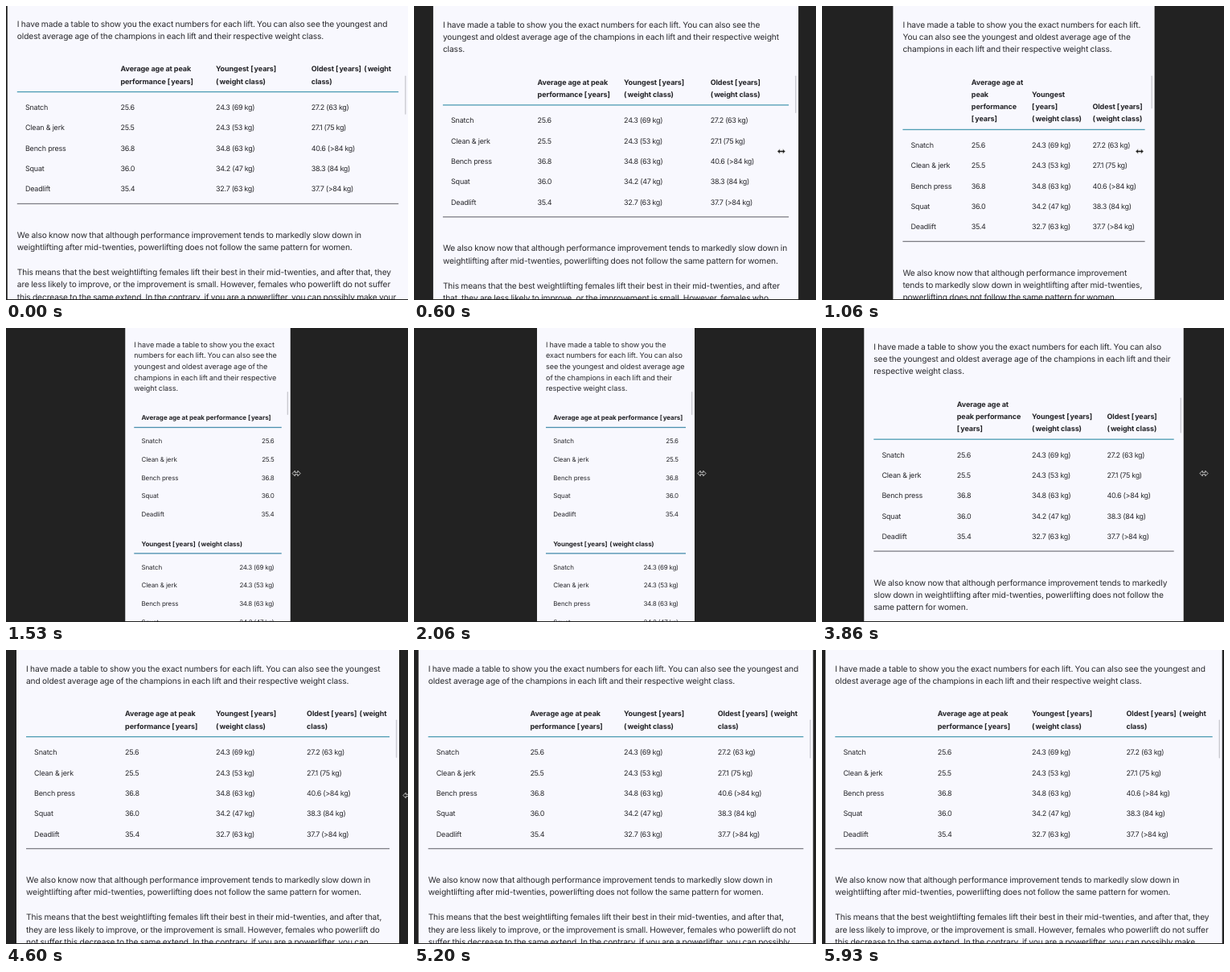
An HTML page that plays this animation: 500 by 365 pixels, repeating every 6000 ms.

```html
<!DOCTYPE html>
<html lang="en">
<head>
<meta charset="utf-8">
<title>Responsive table</title>
<style>
  html, body { margin: 0; width: 100%; height: 100%; overflow: hidden; background: #222; }
  svg { display: block; width: 500px; height: 365px; text-rendering: geometricPrecision; }
  text { font-family: Inter, "Open Sans", sans-serif; fill: #29292d; white-space: pre; }
  .body { font-size: 10.2px; letter-spacing: -.0095em; word-spacing: -.04em; }
  .head { font-size: 9px; font-weight: 700; letter-spacing: -.01em; fill: #222226; }
  .head tspan { letter-spacing: .12em; }
  .label { font-size: 9px; letter-spacing: -.022em; }
  .num { font-size: 9px; letter-spacing: -.035em; }
  .small .body { font-size: 9.07px; letter-spacing: -.005em; }
  .small .head { font-size: 8px; letter-spacing: -.006em; }
  .small .head tspan { letter-spacing: .12em; }
  .small .label { font-size: 8px; letter-spacing: -.013em; }
  .small .num { font-size: 8px; letter-spacing: -.03em; }
</style>
</head>
<body>
<svg viewBox="0 0 500 365">
  <rect id="page" height="364" fill="#f8f8fe"/>
  <g id="content"></g>
  <rect id="bar" width="1.4" rx=".7" fill="#cbcbd2"/>
  <rect y="364" width="500" height="1" fill="#222"/>
  <path id="cursor" d="M-5 0L-1.8 -3.3V-1.2H1.8V-3.3L5 0L1.8 3.3V1.2H-1.8V3.3Z"
        fill="#1c1c1c" stroke="#eee" stroke-width=".8" stroke-linejoin="round"/>
</svg>
<script>
const LOOP = 6000, CENTER = 251, BREAKPOINT = 308;

// [step, x] at 15 steps per second
const EDGE = [[0, 1.8], [5, 4], [10, 31], [16, 88.4], [20, 131], [24, 150.5], [30, 153],
  [31, 153], [43, 154], [46, 154], [50, 150], [58, 52.3], [60, 40], [69, 13], [70, 12],
  [80, 5], [89, 4.3]];
const CURSOR = [[0, 512], [4, 503], [10, 447], [16, 395], [20, 372], [25, 358], [31, 358],
  [43, 357], [46, 357], [50, 381], [58, 475], [60, 480], [69, 499], [74, 507], [89, 512]];

const INTRO = "I have made a table to show you the exact numbers for each lift. You can also see the youngest and oldest average age of the champions in each lift and their respective weight class.";
const NOTES = [
  "We also know now that although performance improvement tends to markedly slow down in weightlifting after mid-twenties, powerlifting does not follow the same pattern for women.",
  "This means that the best weightlifting females lift their best in their mid-twenties, and after that, they are less likely to improve, or the improvement is small. However, females who powerlift do not suffer this decrease to the same extend. In the contrary, if you are a powerlifter, you can possibly make your"
];
const LIFTS = ["Snatch", "Clean & jerk", "Bench press", "Squat", "Deadlift"];
const COLUMNS = [
  ["Average age at peak performance [years]", "25.6", "25.5", "36.8", "36.0", "35.4"],
  ["Youngest [years] (weight class)", "24.3 (69 kg)", "24.3 (53 kg)", "34.8 (63 kg)", "34.2 (47 kg)", "32.7 (63 kg)"],
  ["Oldest [years] (weight class)", "27.2 (63 kg)", "27.1 (75 kg)", "40.6 (>84 kg)", "38.3 (84 kg)", "37.7 (>84 kg)"]
];
const BRACKETS = /[[\]()]/g;

const $ = id => document.getElementById(id);
const ctx = document.createElement("canvas").getContext("2d");

// Returns a width function scaled so that the sample spans the given pixels
function ruler(weight, sample, span, bracketSpace = 0) {
  const raw = s => {
    ctx.font = `${weight} 100px Inter, "Open Sans", sans-serif`;
    ctx.wordSpacing = "-4px";
    return ctx.measureText(s).width + bracketSpace * (s.match(BRACKETS) || []).length;
  };
  const k = span / raw(sample);
  return s => raw(s) * k;
}
const SAMPLE = "oldest average age of the champions in each lift and their respective weight class.";
const wideRuler = ruler(400, SAMPLE, 383);
const smallRuler = ruler(400, SAMPLE, 343.3);
const headRuler = ruler(700, "performance [years]", 91.9, 12);

function wrap(text, width, measure) {
  const lines = [];
  let line = "";
  for (const word of text.split(" ")) {
    const next = line ? line + " " + word : word;
    if (line && measure(next) > width) {
      lines.push(line);
      line = word;
    } else line = next;
  }
  return [...lines, line];
}

// Monotone cubic through the points
function curve(points, x) {
  const n = points.length - 1;
  const slope = i => (points[i + 1][1] - points[i][1]) / (points[i + 1][0] - points[i][0]);
  const tangent = i => {
    if (i === 0 || i === n) return 0;
    const a = slope(i - 1), b = slope(i);
    return a * b > 0 ? 2 * a * b / (a + b) : 0;
  };
  let i = 0;
  while (i < n - 1 && x >= points[i + 1][0]) i++;
  const [x0, y0] = points[i], [x1, y1] = points[i + 1];
  const h = x1 - x0, u = Math.min(1, (x - x0) / h), v = 1 - u;
  return y0 * v * v * (1 + 2 * u) + y1 * u * u * (3 - 2 * u)
    + h * u * v * (tangent(i) * v - tangent(i + 1) * u);
}

const escape = s => s.replace(/&/g, "&amp;").replace(/</g, "&lt;").replace(/>/g, "&gt;");
const markup = (kind, x, y, inner, anchor) =>
  `<text class="${kind}" x="${x}" y="${y}" text-anchor="${anchor}">${inner}</text>`;
const text = (kind, x, y, s, anchor = "start") => markup(kind, x, y, escape(s), anchor);
const heading = (x, y, s) =>
  markup("head", x, y, escape(s).replace(BRACKETS, "<tspan>$&</tspan>"), "start");
const rule = (x, y, width, color) =>
  `<rect x="${x}" y="${y - .6}" width="${width}" height="1.3" fill="${color}"/>`;
const block = (lines, x, y, step) =>
  lines.map((s, i) => text("body", x, y + i * step, s)).join("");

function wideLayout(x, width, y) {
  const step = 15.25, cell = width / 4, pad = 10.1, slack = .7;
  const intro = wrap(INTRO, width + slack, wideRuler);
  let out = block(intro, x, y + 3.6, step);

  const heads = COLUMNS.map(c => wrap(c[0], cell * .905, headRuler));
  const rows = Math.max(...heads.map(h => h.length));
  y += intro.length * step + 25.6 + (rows - 1) * step;
  const colX = c => x + cell * c + pad;
  heads.forEach((lines, c) => lines.forEach((s, i) => {
    out += heading(colX(c + 1), y + 3.2 - (lines.length - 1 - i) * step, s);
  }));

  y += 13.2;
  out += rule(x, y, width, "#4d9cb4");
  LIFTS.forEach((lift, r) => {
    const base = y + 19.3 + r * 25.35 + 3.2;
    out += text("label", colX(0), base, lift);
    COLUMNS.forEach((c, i) => out += text("num", colX(i + 1), base, c[r + 1]));
  });

  y += 19.3 + 4 * 25.35 + 18.2;
  out += rule(x, y, width, "#7f7f86");
  y += 39;
  for (const note of NOTES) {
    const lines = wrap(note, width + slack, wideRuler);
    out += block(lines, x, y + 3.6, step);
    y += (lines.length + 1) * step + .4;
  }
  return out;
}

function smallLayout(x, width, y) {
  const step = 13.55, pad = 9.2;
  const intro = wrap(INTRO, width, smallRuler);
  let out = block(intro, x, y + 3.3, step);
  y += (intro.length - 1) * step + 36.5;
  for (const [head, ...values] of COLUMNS) {
    out += heading(x + pad, y + 2.9, head);
    out += rule(x, y + 12.1, width, "#4b8fae");
    values.forEach((value, r) => {
      const base = y + 29 + r * 22.75 + 2.9;
      out += text("label", x + pad, base, LIFTS[r]);
      out += text("num", x + width - pad, base, value, "end");
    });
    y += 156.4;
  }
  return out;
}

function place(el, attrs) {
  for (const key in attrs) el.setAttribute(key, attrs[key]);
}

function render(step) {
  const left = curve(EDGE, step), width = 2 * (CENTER - left);
  const small = width < BREAKPOINT, pad = small ? 11 : 12;
  const layout = small ? smallLayout : wideLayout;
  const top = small ? 20.6 : 22 + 1.1 * Math.min(1, step / 5);
  $("content").setAttribute("class", small ? "small" : "");
  $("content").innerHTML = layout(left + pad, width - 2 * pad, top);
  place($("page"), { x: left, width });
  place($("bar"), {
    x: left + width - 4.1,
    y: small ? 79 : 86.5,
    height: small ? 29 : 41 + (width - 325) * .042
  });
  $("cursor").setAttribute("transform", `translate(${curve(CURSOR, step)} 180.5)`);
}

let shown = -1;
function tick() {
  const ticks = Math.floor(performance.now() % LOOP / 10);
  const step = Math.ceil(3 * (ticks + 1) / 20) - 1;
  if (step !== shown) render(shown = step);
  requestAnimationFrame(tick);
}
tick();
</script>
</body>
</html>
```
